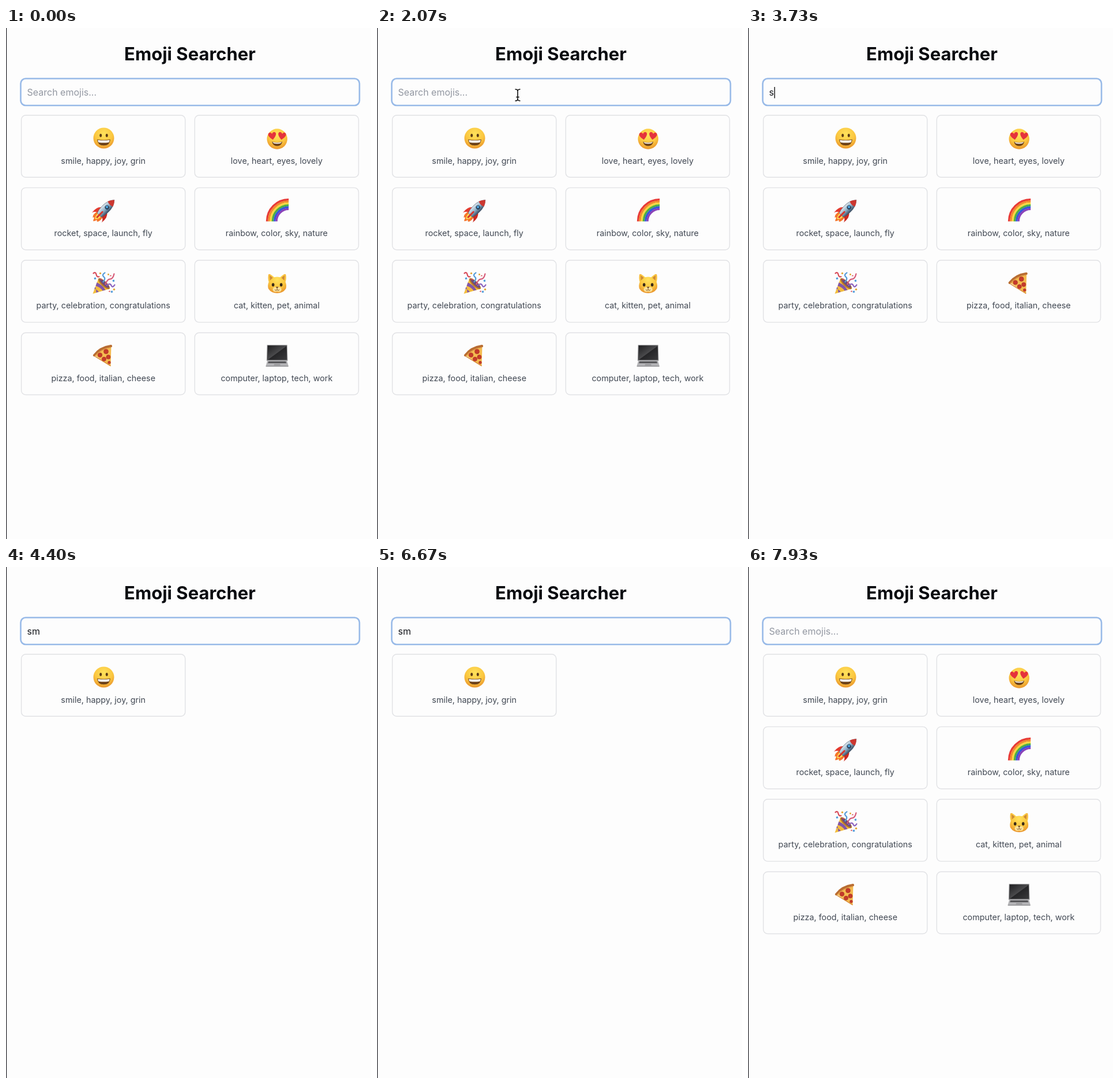
Recreate the animation shown at these times as an HTML page. Size 633x884 px, loop 8000 ms.

```html
<!DOCTYPE html>
<html lang="en">
<head>
<meta charset="utf-8">
<title>Emoji Searcher</title>
<style>
html, body { margin: 0; width: 100%; height: 100%; overflow: hidden; background: #fdfdfd; }
svg { display: block; font-family: Inter, Roboto, sans-serif; }
.label { font-size: 14.35px; fill: #414853; text-anchor: middle; }
.box { fill: none; stroke: #e1e2e5; stroke-width: 1.4; }
</style>
</head>
<body>
<svg width="633" height="884" viewBox="0 0 633 884">
  <defs>
    <radialGradient id="skin" cx=".5" cy=".3" r=".72">
      <stop offset="0" stop-color="#ffe25c"/><stop offset=".6" stop-color="#fbc63f"/><stop offset="1" stop-color="#e8922c"/>
    </radialGradient>
    <linearGradient id="body"><stop offset="0" stop-color="#dfe9ef"/><stop offset=".5" stop-color="#8fb0c8"/><stop offset="1" stop-color="#34485e"/></linearGradient>
    <linearGradient id="screen" x2="1" y2="1"><stop offset="0" stop-color="#1d1d1f"/><stop offset=".5" stop-color="#4a4a4c"/><stop offset=".52" stop-color="#252527"/><stop offset="1" stop-color="#3a3a3c"/></linearGradient>
    <path id="heart" d="M0 6.5C-4 3-7-.5-6.3-3.5C-5.5-6.5-1.5-6.5 0-3.2C1.5-6.5 5.5-6.5 6.3-3.5C7-.5 4 3 0 6.5Z" fill="#e5323c"/>

    <g id="smile">
      <circle r="18" fill="url(#skin)"/>
      <ellipse cx="-5.3" cy="-4.7" rx="2" ry="2.9" fill="#5b3a16"/>
      <ellipse cx="5.3" cy="-4.7" rx="2" ry="2.9" fill="#5b3a16"/>
      <path d="M-11.5 2.2Q0 4.2 11.5 2.2Q10.5 12.8 0 12.8Q-10.5 12.8-11.5 2.2Z" fill="#6d4118"/>
      <path d="M-10.2 3.2Q0 5 10.2 3.2Q9.8 7 8.5 7.4Q0 8.8-8.5 7.4Q-9.8 7-10.2 3.2Z" fill="#fff"/>
    </g>
    <g id="love">
      <circle cy="1.5" r="17.7" fill="url(#skin)"/>
      <use href="#heart" transform="translate(-8.3 -4) rotate(-9) scale(1.05)"/>
      <use href="#heart" transform="translate(8.3 -4) rotate(9) scale(1.05)"/>
      <path d="M-9 6Q0 9 9 6Q7.5 13.8 0 13.8Q-7.5 13.8-9 6Z" fill="#6d4118"/>
      <path d="M-8 6.7Q0 9.2 8 6.7Q7 9.6 0 9.8Q-7 9.6-8 6.7Z" fill="#fff"/>
    </g>
    <g id="rocket" transform="rotate(45)">
      <path d="M-7 10Q-9 18-5 22Q-4 20-3 20Q-2 24 0 26Q2 24 3 20Q4 20 5 22Q9 18 7 10Z" fill="#f5762b"/>
      <path d="M-4 11Q-4 18 0 21Q4 18 4 11Z" fill="#ffdf55"/>
      <path d="M-6-2Q-14 3-12 17Q-10 11-5 10Z" fill="#e43a2f"/>
      <path d="M6-2Q14 3 12 17Q10 11 5 10Z" fill="#c92922"/>
      <path d="M0-26Q-8-17-7.5-4Q-7.5 5-5 11H5Q7.5 5 7.5-4Q8-17 0-26Z" fill="url(#body)" stroke="#455566" stroke-width=".6"/>
      <path d="M0-26Q-5-21-6.2-16Q0-13.5 6.2-16Q5-21 0-26Z" fill="#cc3730"/>
      <circle cy="-8" r="3.6" fill="#24384f"/><circle cx="-.5" cy="-8.4" r="2.2" fill="#4fa3dc"/>
      <path d="M-1.5 3Q0 0 1.5 3L1.5 17Q0 19-1.5 17Z" fill="#d8352c"/>
    </g>
    <g id="rainbow" fill="none" stroke-width="3.5"></g>
    <g id="party">
      <path d="M-19 18.5L-9-8Q3-3 10 10Z" fill="#f3bd3d"/>
      <path d="M-12-1Q-1 4 3 12L-2 13.3Q-6 7-14 5ZM-15.8 9.5Q-11 12-8.5 15L-13 16.5Q-14-.8-17.2 13.5Z" fill="#8256a8"/>
      <ellipse cx=".5" cy="1" rx="13" ry="4.6" transform="rotate(43 .5 1)" fill="#b87927"/>
      <ellipse cx="1" cy=".5" rx="11" ry="3" transform="rotate(43 1 .5)" fill="#6d4a7b"/>
      <g fill="none" stroke-width="2.2" stroke-linecap="round">
        <path d="M-18-17Q-14-20-13-15T-8-11" stroke="#d84b59"/>
        <path d="M-1-2Q4-8 0-11T2-18" stroke="#549bd8"/>
        <path d="M3 2Q6-7 11-7T18-16" stroke="#d65b78"/>
        <path d="M5 4Q11-1 13 4T19 3" stroke="#8b62bd"/>
      </g>
      <g fill="#e2a531">
        <circle cx="-6" cy="-17" r="1.6"/><circle cx="18" cy="11" r="1.7"/><circle cx="8" cy="-15" r="1.5"/>
      </g>
      <path d="M-17-9l3-1 1 3-3 1ZM12 14l3-1 1 3-3 1ZM15-5l3-1 1 3-3 1Z" fill="#4f9bd9"/>
      <path d="M-7-6l3-2 1 3ZM10-12l2-2 2 2ZM8 14l3-1 0 3Z" fill="#d94d57"/>
    </g>
    <g id="cat">
      <path d="M-15-15Q-13-17.5-5-10Q0-11.5 5-10Q13-17.5 15-15Q16.5-8 14.5-2Q17 5 15 10Q10 17.5 0 17.5Q-10 17.5-15 10Q-17 5-14.5-2Q-16.5-8-15-15Z" fill="url(#skin)"/>
      <path d="M-13-12.5Q-11-13-7.5-9L-12.5-4.5ZM13-12.5Q11-13 7.5-9L12.5-4.5Z" fill="#cf8c36"/>
      <ellipse cx="-7" cy="3" rx="2.3" ry="3" fill="#3a2a18"/><ellipse cx="7" cy="3" rx="2.3" ry="3" fill="#3a2a18"/>
      <ellipse cx="-3" cy="11" rx="4.6" ry="4" fill="#fbe19a"/><ellipse cx="3" cy="11" rx="4.6" ry="4" fill="#fbe19a"/>
      <path d="M-2.4 6.5H2.4L0 9.3Z" fill="#5d3b28"/>
      <path d="M0 9V11.5M-4 11.5Q-1.5 14 0 11.5Q1.5 14 4 11.5" fill="none" stroke="#7b5126"/>
    </g>
    <g id="pizza">
      <path d="M-16.5-1.5Q-7-15 13-17L12 18.5Z" fill="#f4bb50"/>
      <path d="M-16.5-.5Q-6-14 12.5-16.5" fill="none" stroke="#b96d32" stroke-width="4.2" stroke-linecap="round"/>
      <path d="M-15.5 1.2Q-5-11.5 12-14" fill="none" stroke="#e29b46" stroke-width="1.4"/>
      <path d="M-15 1.5L12 18" stroke="#d98c38" stroke-width="1.4"/>
      <g fill="#c53a2b" stroke="#a82f23" stroke-width=".6">
        <circle cx="4" cy="-7" r="4"/><circle cx="-6.5" cy="-1" r="3.8"/><circle cx="8" cy="2.5" r="3.6"/><circle cx=".5" cy="6" r="3.6"/><circle cx="9.5" cy="12" r="2.4"/>
      </g>
    </g>
    <g id="laptop">
      <path d="M-17.5-18.5H17.5L18.3 9H-18.3Z" fill="#929294"/>
      <path d="M-16.5-17.5H16.5L17.2 7.5H-17.2Z" fill="url(#screen)"/>
      <path d="M-17 9H17L19.5 17.5H-19.5Z" fill="#b4b4b7"/>
      <path d="M-15 10H15L16 13.3H-16Z" fill="#58585b"/>
      <path d="M-5 14.5H5L5.7 17H-5.7Z" fill="#98989b"/>
      <path d="M-19.5 17.5H19.5V19H-19.5Z" fill="#858588"/>
    </g>

    <g id="hand" stroke="#111" stroke-width="1.5" stroke-linejoin="round">
      <path d="M-1.5 2.5C-2.5-.5 1-1.5 2.2 1L4.6 7C6 5.3 7.8 6 8 7.4C9.4 6.2 11 7 11.2 8.3C12.6 7.5 14 8.5 14 10C14.4 14 14 16 12.5 18V21.3L4 22C3 18.5 0 16-3.5 12.6C-5 10.5-2.5 9-1 10.4L1.8 11.8Z" fill="#fff"/>
      <path d="M5.5 13L6.2 17.5M8.2 12.5L8.8 17M10.9 12.5V16.5" fill="none" stroke-width="1.1"/>
    </g>
    <path id="arrow" d="M0 0V16.5L3.8 13L6.4 19L9 17.9L6.5 12H11.7Z" fill="#111" stroke="#fff" stroke-width="1.2"/>
    <g id="beam" fill="none">
      <path id="stem" d="M-4.5-10Q0-10 0-7Q0-10 4.5-10M0-7V7M-4.5 10Q0 10 0 7Q0 10 4.5 10M-2.8 3.5H2.8" stroke="#fff" stroke-width="3.4"/>
      <path d="M-4.5-10Q0-10 0-7Q0-10 4.5-10M0-7V7M-4.5 10Q0 10 0 7Q0 10 4.5 10M-2.8 3.5H2.8" stroke="#111" stroke-width="1.6"/>
    </g>
  </defs>

  <rect width="633" height="884" fill="#fdfdfd"/>
  <rect width="1.2" height="884" fill="#25252a"/>
  <text x="319" y="55.5" text-anchor="middle" font-size="31" font-weight="700" fill="#090b10" id="title">Emoji Searcher</text>
  <rect x="25.5" y="87.5" width="587.5" height="46.5" rx="8.5" fill="#fdfdfd" stroke="#98bae8" stroke-width="2.6"/>
  <text id="query" x="36.5" y="117.3" font-size="16"></text>
  <rect id="caret" y="102" width="1.4" height="19.5" fill="#111"/>
  <g id="cards"></g>
  <use id="pointer"/>
</svg>
<script>
const $ = id => document.getElementById(id);
const LOOP = 8000, PITCH_X = 300.7, PITCH_Y = 125.4;

const items = [
  ['smile', 'smile, happy, joy, grin'],
  ['love', 'love, heart, eyes, lovely'],
  ['rocket', 'rocket, space, launch, fly'],
  ['rainbow', 'rainbow, color, sky, nature'],
  ['party', 'party, celebration, congratulations'],
  ['cat', 'cat, kitten, pet, animal'],
  ['pizza', 'pizza, food, italian, cheese'],
  ['laptop', 'computer, laptop, tech, work']
];

$('rainbow').innerHTML = ['#e83b36', '#f38a2e', '#f8d83f', '#4caf45', '#3557dc', '#8a43ba'].map((color, i) => {
  const r = 37.6 - i * 3.3;
  return `<path d="M${20 - r} 18.5A${r} ${r} 0 0 1 20 ${18.5 - r}" stroke="${color}"/>`;
}).join('');

$('cards').innerHTML = items.map(([icon, words]) => `<g>
  <rect class="box" x="26.6" y="151" width="284.2" height="107.3" rx="7.5"/>
  <use href="#${icon}" x="169.5" y="190.5"/>
  <text class="label" x="168.7" y="234.7">${words}</text></g>`).join('');
const cards = [...$('cards').children];

// Typed text and the time of the last key press
function typed(t) {
  const keys = [[7000, ''], [6870, 's'], [3900, 'sm'], [3730, 's']];
  return keys.find(([at]) => t >= at) || [-440, ''];
}

function drawPointer(t) {
  const shown = t >= 1050 && t < 3730;
  $('pointer').style.display = shown ? '' : 'none';
  if (!shown) return;
  let x, y;
  if (t < 1130) {
    const u = (1130 - t) / 80;
    x = 600 + 38 * u;
    y = 325 + 22 * u;
  } else {
    const u = Math.min(1, (t - 1130) / 600), e = 1 - (1 - u) ** 2;
    x = 600 - 356 * e;
    y = 325 - 209 * e;
  }
  const inCard = x > 26 && x < 611 && (x - 26) % PITCH_X < 285 && y > 151 && (y - 151) % PITCH_Y < 108;
  const shape = y < 135 ? 'beam' : inCard ? 'hand' : 'arrow';
  $('pointer').setAttribute('href', '#' + shape);
  $('pointer').setAttribute('transform', `translate(${x} ${y})`);
}

function draw(now) {
  const t = now % LOOP, [keyTime, text] = typed(t);
  const query = $('query');
  query.textContent = text || 'Search emojis...';
  query.setAttribute('fill', text ? '#15171c' : '#9297a1');
  $('caret').setAttribute('x', text ? 37 + query.getComputedTextLength() : 36.8);
  const blink = (t - keyTime) % 1000;
  const lit = keyTime < 0 ? blink >= 530 || blink < 5 : blink < 500;
  $('caret').style.display = lit ? '' : 'none';

  let slot = 0;
  items.forEach(([, words], i) => {
    const match = words.includes(text);
    cards[i].style.display = match ? '' : 'none';
    if (!match) return;
    cards[i].setAttribute('transform', `translate(${slot % 2 * PITCH_X} ${(slot >> 1) * PITCH_Y})`);
    slot++;
  });
  drawPointer(t);
  requestAnimationFrame(draw);
}
requestAnimationFrame(draw);
</script>
</body>
</html>
```
